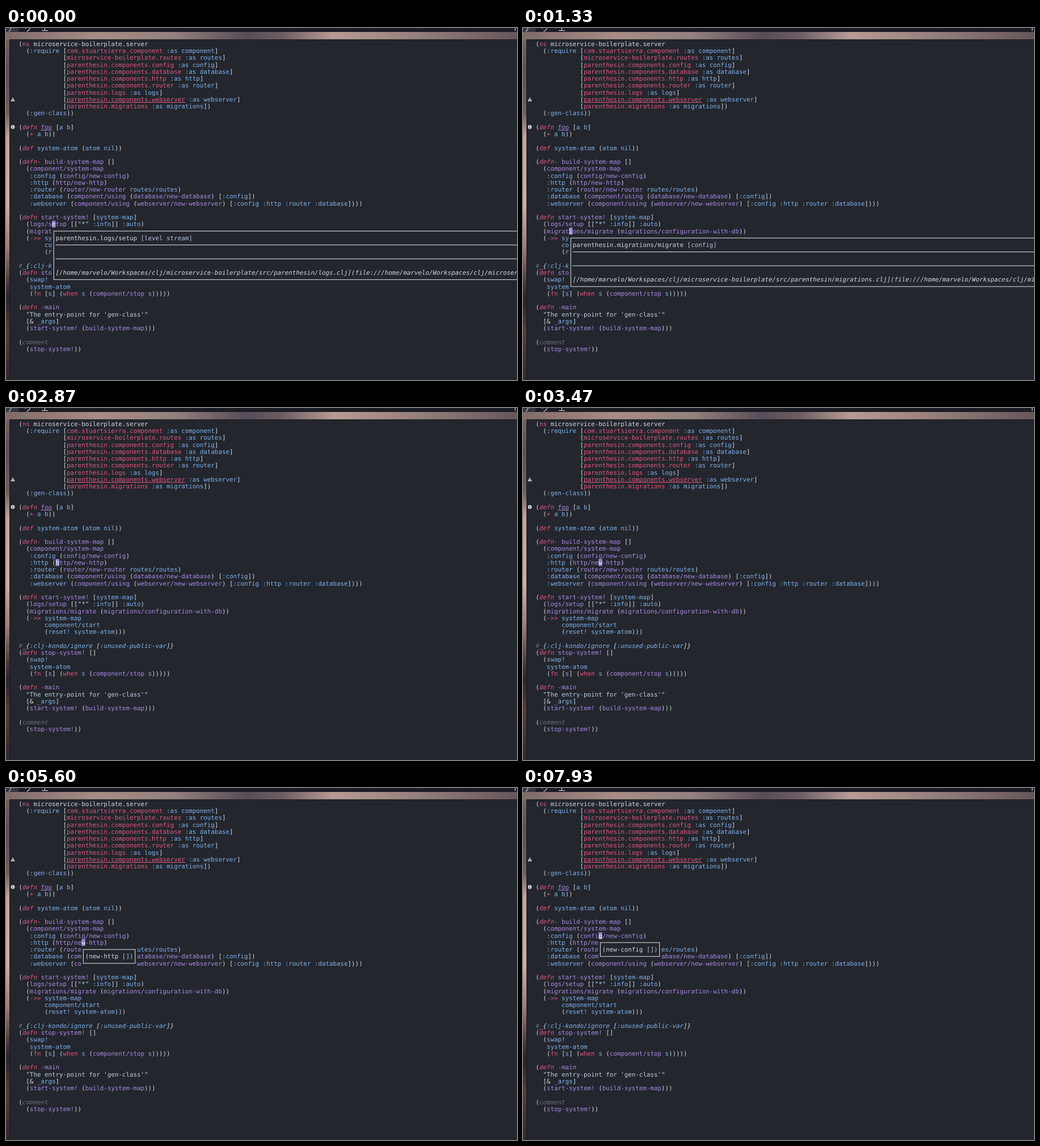
Animation of 901x622 px, one loop 8000 ms. Source, as an HTML page with a canvas:

```html
<!DOCTYPE html>
<html lang="en">
<head>
<meta charset="utf-8">
<title>Editor hover docs</title>
<style>
html, body { margin: 0; width: 100%; height: 100%; overflow: hidden; background: #23262d; }
canvas { display: block; }
</style>
</head>
<body>
<canvas id="stage" width="901" height="622"></canvas>
<script>
const W = 901, H = 622, LOOP = 8000;
const X0 = 22.3, Y0 = 22, CW = 6.52, LH = 12.25;
const FONT = '10.83px "DejaVu Sans Mono", "Noto Sans Mono", monospace';
const C = {
  bg: '#23262d', fg: '#d3d7df', pink: '#e2557f', blue: '#7fb3ec', purple: '#a98ae2',
  grey: '#686c77', string: '#bccfe4', cursor: '#9080cc', line: '#d4d7dd', args: '#b4c3da'
};

const code = `(ns microservice-boilerplate.server
  (:require [com.stuartsierra.component :as component]
            [microservice-boilerplate.routes :as routes]
            [parenthesin.components.config :as config]
            [parenthesin.components.database :as database]
            [parenthesin.components.http :as http]
            [parenthesin.components.router :as router]
            [parenthesin.logs :as logs]
            [parenthesin.components.webserver :as webserver]
            [parenthesin.migrations :as migrations])
  (:gen-class))

(defn foo [a b]
  (+ a b))

(def system-atom (atom nil))

(defn- build-system-map []
  (component/system-map
   :config (config/new-config)
   :http (http/new-http)
   :router (router/new-router routes/routes)
   :database (component/using (database/new-database) [:config])
   :webserver (component/using (webserver/new-webserver) [:config :http :router :database])))

(defn start-system! [system-map]
  (logs/setup [["*" :info]] :auto)
  (migrations/migrate (migrations/configuration-with-db))
  (->> system-map
       component/start
       (reset! system-atom)))

#_{:clj-kondo/ignore [:unused-public-var]}
(defn stop-system! []
  (swap!
   system-atom
   (fn [s] (when s (component/stop s)))))

(defn -main
  "The entry-point for 'gen-class'"
  [& _args]
  (start-system! (build-system-map)))

(comment
  (stop-system!))`.split('\n');

const special = new Set(['ns', 'def', 'defn', 'defn-', 'fn', 'when', '+', '->>']);
const builtin = new Set(['atom', 'swap!', 'reset!']);

function colourOf(word, prev) {
  if (/^([()[\]{}&]|_$)/.test(word)) return C.fg;
  if (word[0] === '"') return C.string;
  if (word[0] === ':') return C.blue;
  if (word === '#' || word === 'comment') return C.grey;
  if (prev === '(') return special.has(word) ? C.pink : builtin.has(word) ? C.blue : C.purple;
  if (prev === 'ns') return C.fg;
  if (prev === '[' && word.includes('.')) return C.pink;
  return /^defn/.test(prev) ? C.purple : C.blue;
}

const stage = document.getElementById('stage').getContext('2d');
const base = document.createElement('canvas');
base.width = W;
base.height = H;

const x = col => X0 + col * CW;
const y = row => Y0 + row * LH;

function rect(g, left, top, w, h, fill) {
  g.fillStyle = fill;
  g.fillRect(left, top, w, h);
}

function text(g, row, col, str, fill, italic) {
  g.font = (italic ? 'italic ' : '') + FONT;
  g.textRendering = 'geometricPrecision';
  g.fillStyle = fill;
  for (let i = 0; i < str.length && x(col + i) < W; i++) {
    if (str[i] !== ' ') g.fillText(str[i], x(col + i), y(row) + 9.8);
  }
}

function gradient(g, x1, y1, stops) {
  const fill = g.createLinearGradient(0, 0, x1, y1);
  stops.forEach(([at, colour]) => fill.addColorStop(at, colour));
  return fill;
}

function drawDesktop(g) {
  rect(g, 0, 0, W, H, gradient(g, 0, H, [
    [0, '#7d6866'], [.12, '#5e4d52'], [.24, '#725d5e'], [.31, '#c6a598'], [.5, '#d0ada0'],
    [.62, '#a07c75'], [.72, '#4e3b3d'], [.77, '#2b2327'], [.86, '#573b39'], [1, '#33282c']]));
  rect(g, 0, 7, W, 14, gradient(g, W, 0, [
    [0, '#806b69'], [.18, '#a68c85'], [.33, '#94807e'], [.47, '#574c57'], [.54, '#6c5d63'],
    [.64, '#b79b94'], [.8, '#96807d'], [1, '#66565a']]));
  rect(g, 0, 0, W, 7, '#1b1c24');
  rect(g, 0, 0, 22, 7, '#353640');
  g.save();
  g.beginPath();
  g.rect(0, 0, W, 7);
  g.clip();
  g.fillStyle = '#dcdde2';
  g.font = '13px "Noto Sans CJK JP", "Noto Sans CJK", sans-serif';
  [...'アウエ'].forEach((ch, i) => g.fillText(ch, 2 + i * 30, 5));
  g.fillText('m', 896, 5);
  g.restore();
  rect(g, 6, 20, W, H, '#1b1d24');
  rect(g, 7.5, 21, W, H, C.bg);
}

function drawCode(g) {
  code.forEach((line, row) => {
    const discard = line.startsWith('#_');
    let prev = '';
    for (const m of line.matchAll(/"[^"]*"|#|_(?=\{)|[()[\]{}]|[^\s()[\]{}]+?(?=[\s()[\]{}]|$)/g)) {
      const word = m[0];
      const italic = discard || /^(defn?-?|comment)$/.test(word);
      text(g, row, m.index, word, colourOf(word, prev), italic);
      prev = word;
    }
  });
  rect(g, x(13), 131, 32 * CW, 1, C.pink);
  rect(g, x(6), 180, 3 * CW, 1, C.purple);
}

function drawSigns(g) {
  g.fillStyle = '#d2d4d8';
  g.beginPath();
  g.moveTo(12, 122.5);
  g.lineTo(15.8, 129.5);
  g.lineTo(8.2, 129.5);
  g.fill();
  g.beginPath();
  g.arc(12, 175, 3.4, 0, 7);
  g.fill();
  rect(g, 11.5, 125, 1, 2, C.bg);
  rect(g, 11.5, 128, 1, 1, C.bg);
  rect(g, 11.5, 172.8, 1, 1, C.bg);
  rect(g, 11.5, 174.6, 1, 2.6, C.bg);
}

const hover = (name, args, file) => ({ name, args, file, cols: 140, rows: 6 });
const signature = (name, args) => ({ name, args, cols: name.length + args.length, rows: 1 });
const popups = {
  setup: hover('parenthesin.logs/setup ', '[level stream]', 'logs'),
  migrate: hover('parenthesin.migrations/migrate ', '[config]', 'migrations'),
  http: hover('parenthesin.components.http/new-http ', '[]', 'components/http'),
  httpSig: signature('(new-http ', '[])'),
  configSig: signature('(new-config ', '[])')
};

function drawPopup(g, row, col, p) {
  const midX = c => x(col + c) + CW / 2;
  const midY = r => y(row + r) + LH / 2;
  rect(g, x(col), y(row), (p.cols + 2) * CW, (p.rows + 2) * LH, C.bg);
  g.strokeStyle = C.line;
  g.lineWidth = 1.1;
  g.strokeRect(midX(0), midY(0), (p.cols + 1) * CW, (p.rows + 1) * LH);
  text(g, row + 1, col + 1, p.name, C.fg);
  text(g, row + 1, col + 1 + p.name.length, p.args, C.args);
  if (!p.file) return;
  [2, 4].forEach(r => rect(g, x(col + 1), midY(r) - .55, W, 1.1, C.line));
  const path = `/home/marvelo/Workspaces/clj/microservice-boilerplate/src/parenthesin/${p.file}.clj`;
  text(g, row + 6, col + 1, `[${path}](file://${path})`, C.fg, true);
}

// time, cursor row, wanted column, open popup
const steps = [
  [0, 26, 9, 'setup'], [400, 27, 9], [1200, 27, 9, 'migrate'],
  [1800, 26, 9], [1870, 25, 9], [1930, 24, 9], [2000, 23, 9],
  [2330, 22, 9], [2470, 21, 9], [2600, 20, 9], [2740, 20, 10],
  [3130, 20, 14], [3270, 20, 15], [3330, 20, 17], [3530, 20, 17, 'http'],
  [4800, 20, 17], [5400, 20, 17, 'httpSig'],
  [6400, 19, 17], [7200, 19, 17, 'configSig']
];

function draw(now) {
  const t = now % LOOP;
  const [, row, wanted, popup] = steps.findLast(s => s[0] <= t);
  const line = code[row];
  const col = Math.max(0, Math.min(wanted, line.length - 1));
  stage.drawImage(base, 0, 0);
  rect(stage, x(col), y(row), CW, LH, C.cursor);
  text(stage, row, col, line.charAt(col), '#eceaf4');
  if (popup) drawPopup(stage, row + 1, col, popups[popup]);
}

const g = base.getContext('2d');
drawDesktop(g);
drawCode(g);
drawSigns(g);

const start = performance.now();
function tick() {
  draw(Math.max(0, performance.now() - start));
  requestAnimationFrame(tick);
}
tick();
</script>
</body>
</html>
```
